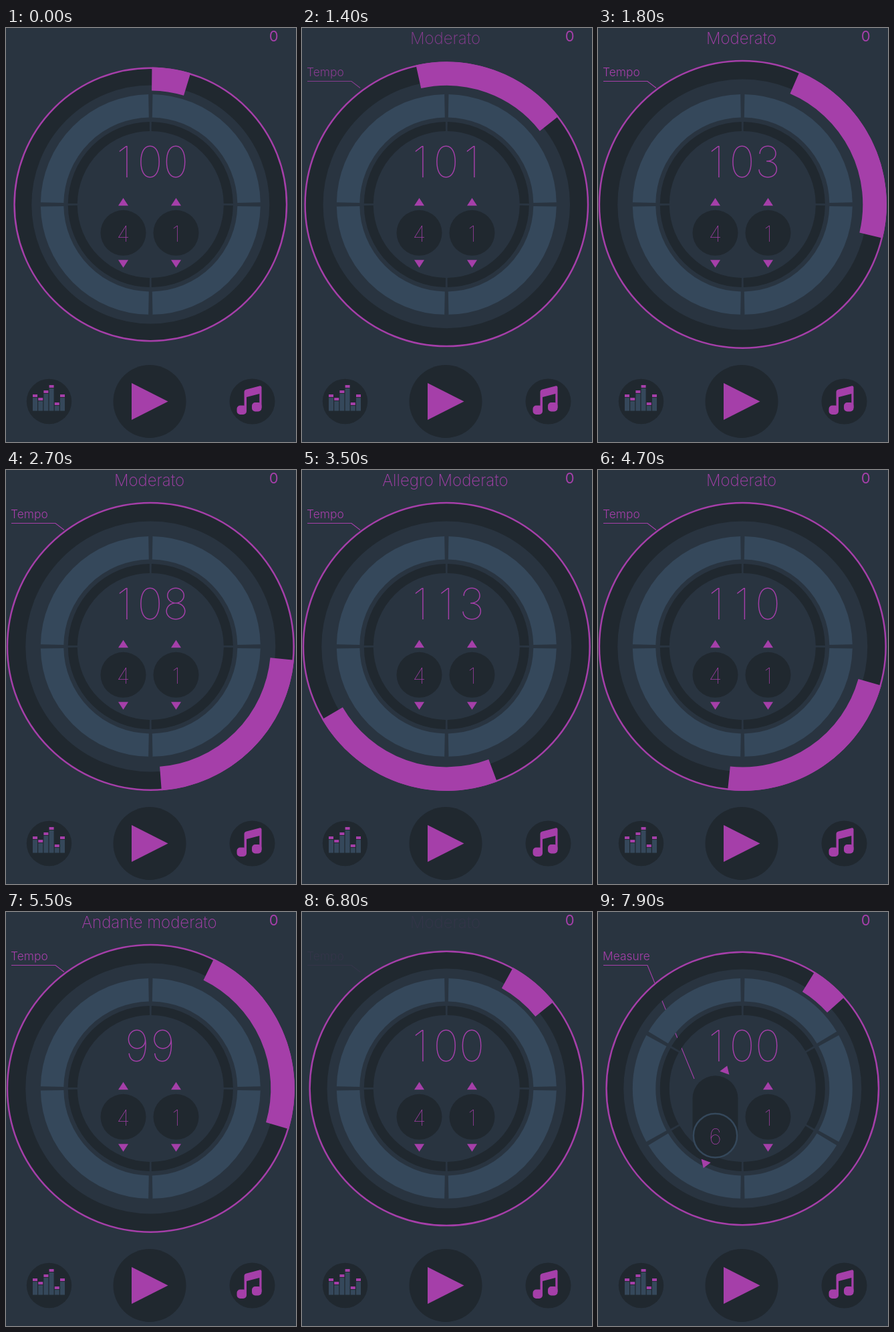
Recreate the animation shown at these times as an HTML page with a canvas. Size 434 by 618 pixels, loop 8000 ms.

```html
<!DOCTYPE html>
<html lang="en">
<head>
<meta charset="utf-8">
<title>Metronome</title>
<style>
  html, body { margin: 0; width: 100%; height: 100%; overflow: hidden; background: #293440; }
  canvas { display: block; }
</style>
</head>
<body>
<canvas id="stage" width="434" height="618"></canvas>
<script>
const ctx = document.getElementById('stage').getContext('2d');
const BG = '#293440', DARK = '#20282f', BLUE = '#35485b', PINK = '#a53fa9';
const CX = 216.3, CY = 263.4, TAU = Math.PI * 2, LOOP = 8000, STEP = 100;
const FONT = 'Inter, Roboto, sans-serif';

// Turning points of the dial
const turns = [
  { time: 1300, angle: 8.8, bpm: 100 },
  { time: 1800, angle: 63.4, bpm: 103 },
  { time: 3500, angle: 199.6, bpm: 113 },
  { time: 4700, angle: 145.8, bpm: 110 },
  { time: 5500, angle: 66.2, bpm: 99 },
  { time: 6600, angle: 40, bpm: 100 },
];

const rad = deg => deg * Math.PI / 180;
const mix = (a, b, k) => a + (b - a) * k;
const ramp = (t, from, to) => Math.min(1, Math.max(0, (t - from) / (to - from)));

function dialAt(t) {
  const i = Math.max(1, turns.findIndex(p => p.time >= t));
  const [a, b] = t > turns.at(-1).time ? turns.slice(-2) : [turns[i - 1], turns[i]];
  const k = ramp(t, a.time, b.time);
  return { angle: mix(a.angle, b.angle, k), bpm: Math.round(mix(a.bpm, b.bpm, k)) };
}

function text(str, x, y, size, weight, align = 'center') {
  ctx.font = `${weight} ${size}px ${FONT}`;
  ctx.textAlign = align;
  ctx.fillStyle = PINK;
  ctx.fillText(str, x, y);
}

// Every digit sits in a cell of the same width
function counter(value) {
  const digits = [...String(value)];
  digits.forEach((d, i) => text(d, 215.5 + (i - (digits.length - 1) / 2) * 38.5, 223, 64.5, 100));
}

function disc(x, y, r) {
  ctx.fillStyle = DARK;
  ctx.beginPath();
  ctx.arc(x, y, r, 0, TAU);
  ctx.fill();
}

// Ring sector, degrees clockwise from the top
function sector(inner, outer, from, to, color) {
  ctx.strokeStyle = color;
  ctx.lineWidth = outer - inner;
  ctx.beginPath();
  ctx.arc(CX, CY, (inner + outer) / 2, rad(from - 90), rad(to - 90));
  ctx.stroke();
}

function triangle(points) {
  ctx.fillStyle = PINK;
  ctx.beginPath();
  points.forEach(([x, y]) => ctx.lineTo(x, y));
  ctx.fill();
}

function arrow(x, y, deg) {
  ctx.save();
  ctx.translate(x, y);
  ctx.rotate(rad(deg));
  triangle([[-7.5, -40.5], [7.5, -40.5], [0, -52]]);
  ctx.restore();
}

function label(str, x, y, alpha) {
  ctx.globalAlpha = alpha;
  text(str, 7, 72, 17.4, 300, 'left');
  ctx.strokeStyle = PINK;
  ctx.lineWidth = 1.1;
  ctx.beginPath();
  ctx.moveTo(8, 79.5);
  ctx.lineTo(74, 79.5);
  ctx.lineTo(x, y);
  ctx.stroke();
  ctx.globalAlpha = 1;
}

function dial(expand, angle, beats) {
  const rim = 205 + 10.6 * expand, half = 8.2 + 31.9 * expand;
  sector(178 + 9 * expand, rim, 0, 360, DARK);
  sector(rim - 2.5, rim, 0, 360, PINK);
  sector(170 + 10 * expand, rim, angle - half, angle + half, PINK);
  const span = 360 / beats;
  for (let from = 0; from < 359; from += span) {
    sector(130, 164.5, from + 1.1, from + span - 1.1, BLUE);
    sector(109.5, 123.5, from + .7, from + span - .7, DARK);
  }
}

function knob(x, value, active = 0, drag = 0) {
  const y = 305.8, stretch = 27.5 * active, valueY = y + 28 * drag;
  ctx.fillStyle = DARK;
  ctx.beginPath();
  ctx.roundRect(x - 34, y - 34 - stretch, 68, 68 + 2 * stretch, 34);
  ctx.fill();
  arrow(x, y - stretch, 20 * drag);
  arrow(x, y + stretch, 180 + 20 * drag);
  ctx.globalAlpha = active;
  ctx.strokeStyle = BLUE;
  ctx.lineWidth = 2.5;
  ctx.beginPath();
  ctx.arc(x, valueY, 32.7, 0, TAU);
  ctx.stroke();
  ctx.globalAlpha = 1;
  text(value, x, valueY + 13, 33, 100);
}

function buttons() {
  disc(64.5, 557.5, 33.7);
  disc(215, 557.5, 54.5);
  disc(368.5, 557.5, 34);
  triangle([[188, 530], [242.5, 557.5], [188, 585]]);

  [24, 19, 30, 38, 12, 24].forEach((height, i) => {
    const x = 40 + i * 8.2, y = 571 - height;
    ctx.fillStyle = PINK;
    ctx.fillRect(x, y, 7, 4);
    ctx.fillStyle = BLUE;
    ctx.fillRect(x, y + 5, 7, height - 4.5);
  });

  ctx.fillStyle = PINK;
  ctx.fill(new Path2D('M356.5 543Q356.5 540.5 359 539.8L380 534.2Q382.5 534 382.5 536.5V567H379.3V546L360 551V571H356.5Z'));
  ctx.beginPath();
  ctx.roundRect(345.5, 563.5, 14.5, 13.5, 5);
  ctx.roundRect(368, 559, 14.5, 13.5, 5);
  ctx.fill();
}

function draw(t) {
  const expand = ramp(t, 1100, 1500) - ramp(t, 6500, 6830);
  const measure = ramp(t, 7000, 7300), drag = ramp(t, 7300, 7900);
  const { angle, bpm } = dialAt(t);
  const beats = 4 + Math.floor(drag * 2.4);
  const tempo = bpm < 100 ? 'Andante moderato' : bpm < 113 ? 'Moderato' : 'Allegro Moderato';

  ctx.fillStyle = BG;
  ctx.fillRect(0, 0, 434, 618);
  label('Tempo', 87, 89.5, expand);
  label('Measure', 144, 249, measure);
  dial(expand, angle, beats);

  ctx.globalAlpha = expand;
  text(tempo, 214.5, 23.5, 24, 200);
  ctx.globalAlpha = 1;
  text('0', 400.8, 20.3, 22, 400);
  counter(bpm);

  knob(175.5, beats, measure, drag);
  knob(254.5, 1);
  buttons();
}

const start = performance.now();
function tick() {
  const t = (performance.now() - start) % LOOP;
  draw(Math.floor(t / STEP) * STEP);
  requestAnimationFrame(tick);
}
tick();
</script>
</body>
</html>
```
